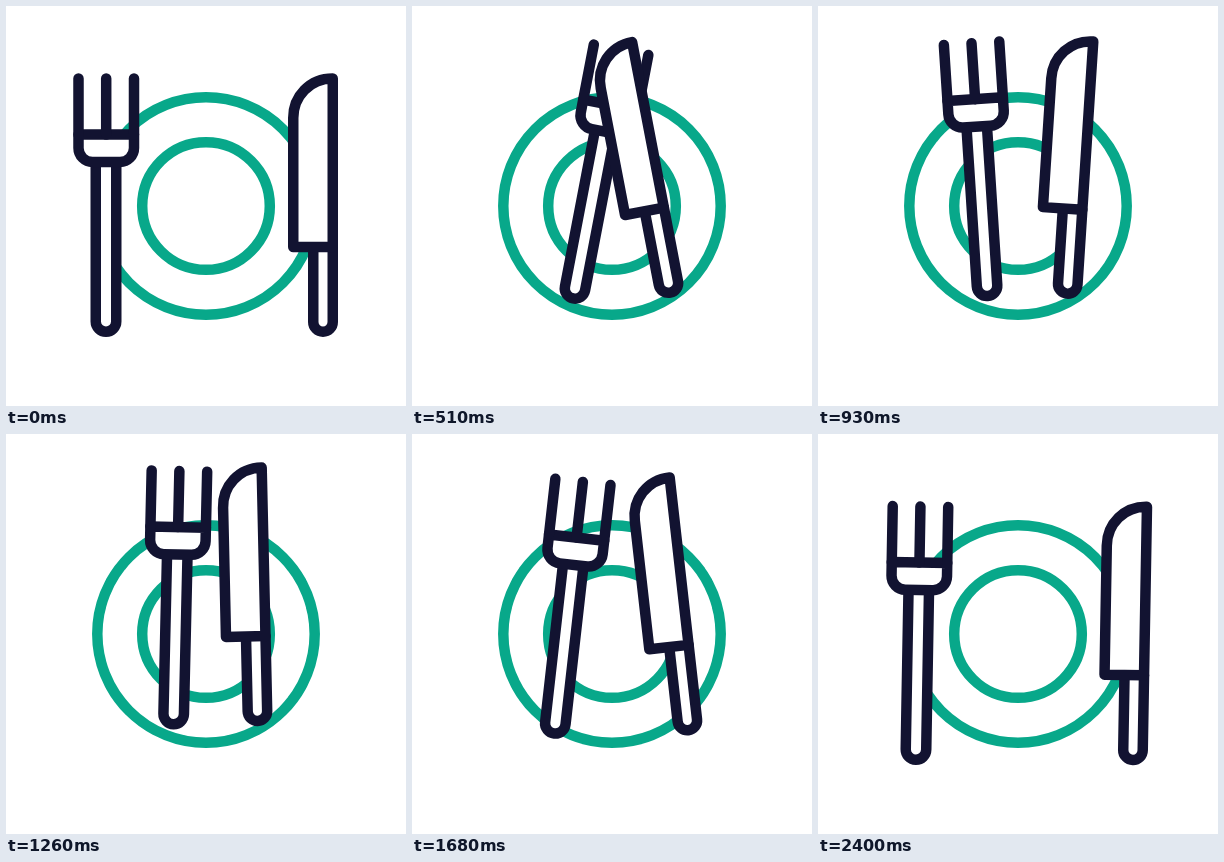
An HTML page for the animation above (4490 ms loop, 400 by 400 pixels).

```html
<!DOCTYPE html>
<html lang="en">
<head>
<meta charset="utf-8">
<title>Cutlery</title>
<style>
  html, body { margin: 0; width: 100%; height: 100%; overflow: hidden; background: #fff; }
  svg { display: block; width: 100%; height: 100%; }
  g { stroke-width: 10.5; stroke-linecap: round; stroke-linejoin: round; }
  #plate { fill: none; stroke: #08a88a; }
  #fork, #knife { fill: #fff; stroke: #121331; }
  .open { fill: none; }
</style>
</head>
<body>
<svg viewBox="0 0 400 400">
  <g id="plate">
    <circle cx="200" cy="200" r="108.7"/>
    <circle cx="200" cy="200" r="63.8"/>
  </g>
  <g id="fork">
    <path d="M89.75 156V315.5a10.25 10.25 0 0 0 20.5 0V156"/>
    <path d="M72.5 128.5V142a14 14 0 0 0 14 14H114a14 14 0 0 0 14-14V128.5Z"/>
    <path class="open" d="M72.5 72.5V128.5M100.2 72.5V128.5M128 72.5V128.5"/>
  </g>
  <g id="knife">
    <path d="M307.25 241V316a9.75 9.75 0 0 0 19.5 0V241"/>
    <path d="M326.75 72.5C304 72.5 287.25 90 287.25 112V241H326.75Z"/>
  </g>
</svg>
<script>
const LOOP = 4490, MOVE_END = 2400, STEP = 30, SWAP = 1030;
const svg = document.querySelector('svg');
const fork = document.getElementById('fork');
const knife = document.getElementById('knife');

const sine = p => (1 - Math.cos(Math.PI * p)) / 2;
const cubic = p => p < .5 ? 4 * p ** 3 : 1 - 4 * (1 - p) ** 3;

// Keys are [time, value, easing used to reach it].
const tracks = {
  x: [[150, 0], [560, 88], [1030, 60.5, cubic], [1545, 88, cubic], [1880, -2.5], [2150, 0]],
  forkY: [[210, 0], [600, -35.5], [1550, -35.5], [1930, 3], [2160, 0]],
  knifeY: [[140, 0], [600, -38.5], [1550, -38.5], [1930, 3], [2160, 0]],
  turn: [[0, 0], [115, -9.5], [555, 11.4], [1030, -4.3, cubic], [1545, 11.4, cubic], [1840, 0]],
  tilt: [[2160, 0], [2400, 1]]
};

function valueAt(keys, t) {
  const i = keys.findIndex(k => k[0] > t);
  if (i < 0) return keys[keys.length - 1][1];
  if (i === 0) return keys[0][1];
  const [t0, v0] = keys[i - 1], [t1, v1, ease = sine] = keys[i];
  return v0 + (v1 - v0) * ease((t - t0) / (t1 - t0));
}

function place(el, pivotX, x, y, angle) {
  el.setAttribute('transform', `translate(${x} ${y}) rotate(${angle} ${pivotX} 200)`);
}

function draw(now) {
  const t = Math.min(Math.floor(now % LOOP / STEP) * STEP, MOVE_END);
  const at = name => valueAt(tracks[name], t);
  const x = at('x'), turn = at('turn'), tilt = at('tilt');
  place(fork, 100, x, at('forkY'), tilt + turn);
  place(knife, 307, -.97 * x, at('knifeY'), tilt - turn);

  // The pieces trade places in depth while they are apart.
  const top = t < SWAP ? knife : fork;
  if (svg.lastElementChild !== top) svg.append(top);
  requestAnimationFrame(draw);
}
draw(performance.now());
</script>
</body>
</html>
```
